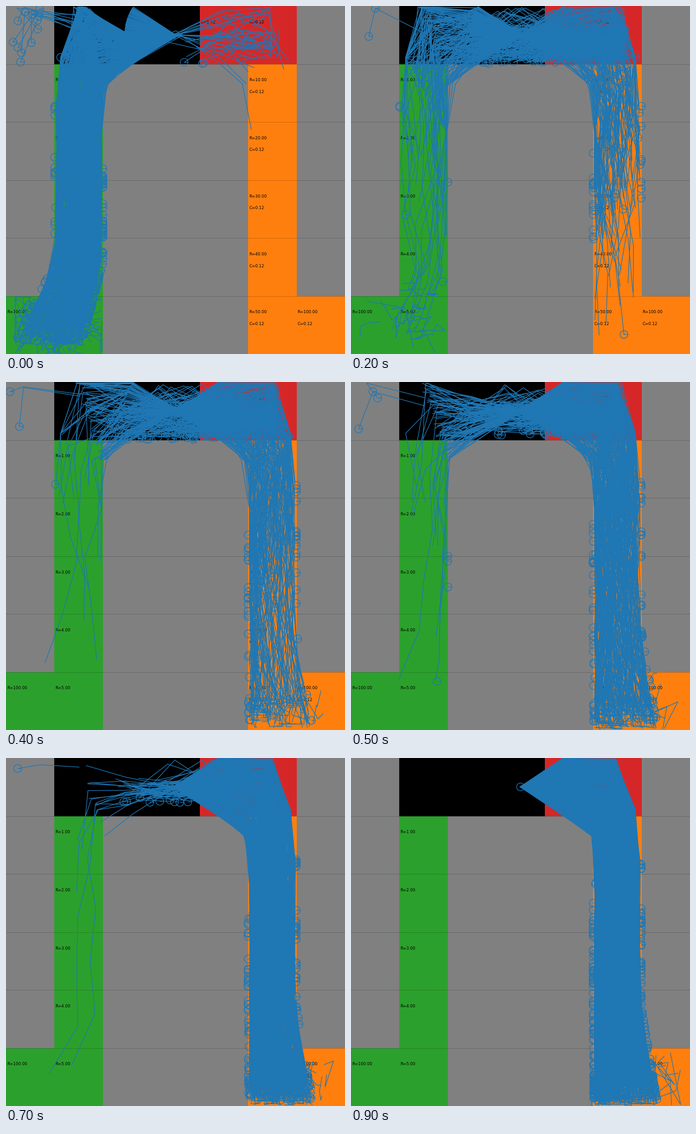
These frames come from a looping animation (738 px wide and 759 px high, 1000 ms). A matplotlib script:

```python
import numpy as np
import matplotlib.pyplot as plt
from matplotlib.animation import FuncAnimation
from matplotlib.collections import LineCollection
from matplotlib.patches import Rectangle

W, H, DPI = 738, 759, 64
PX = 72 / DPI                      # points per pixel
CW, CH = W / 7, H / 6              # grid cell
CX, CY, STEP = 369, 63, 111        # start point and stride of every walk
BLUE, GREEN, RED, ORANGE = "#1f77b4", "#2ca02c", "#d62728", "#ff7f0e"


def keyed(i, frames, values):
    return float(np.interp(i, frames, values))


def count(i, frames, values):
    return round(keyed(i, frames, values))


def bundles(i):
    """Groups of walks: side, count, strides, lowest lane, lane noise."""
    noise = keyed(i, (0, 3, 9), (.2, .3, .02))
    low = .45 if i == 0 else .2 if i > 4 else 0
    groups = [
        (-1, count(i, (1, 3, 4), (260, 180, 0)), 1, 0, .02 + .03 * i),
        (-1, count(i, (0, 1, 2, 4, 8, 9), (400, 380, 14, 4, 2, 0)),
         9 if i < 4 else 7, low, noise),
        (-1, count(i, (1, 2, 3, 5, 7, 9), (0, 150, 100, 75, 10, 0)),
         3 if i < 4 else 2, low, noise),
        (-1, count(i, (1, 2, 4, 7), (0, 22, 18, 3)) * (i < 8), 5 if i < 4 else 4,
         low, noise),
        (1, count(i, (0, 1, 2, 3, 5, 6), (16, 45, 130, 130, 70, 0)),
         2 if i < 2 else 5, 0, noise),
        (1, count(i, (0, 1, 2, 3, 4, 7, 9), (3, 24, 22, 30, 110, 500, 620)),
         min(9, 4 + 8 * i // 5), 0, noise),
    ]
    return [g for g in groups if g[1]]


def above(a, level):
    return np.maximum(a - level, 0)


def walk(rng, side, n, strides, low, noise):
    """Walks from the start, around a corner and down one of the columns."""
    raw = rng.random(n)
    angle = 1.2 * (low + (1 - low) * raw) - .6

    def lane():
        return np.clip(raw + rng.normal(0, noise, n), 0, 1)

    us = [rng.normal(0, 30 * noise, n), STEP * np.cos(angle)]
    vs = [np.full(n, CY), CY + STEP * np.sin(angle)]
    s = lane()
    us.append(206 - 50 * s + rng.normal(0, 30 * noise, n))
    vs.append(2 + 168 * s)
    s = lane()
    u, v = 250 - 89 * s, 112 + 166 * s
    end = rng.uniform(690, 757, n) if side > 0 else rng.uniform(590, 740, n)
    marks = []
    for _ in range(3, strides + 1):
        hit = (u < 160) | (u > 261)
        wall = np.clip(u, 158, 263)
        u = np.where(u < 160, 320 - u, np.where(u > 261, 522 - u, u))
        v = np.minimum(v, end)
        out = (u - 160) / 100
        flare = (above(v, 540) * .17 * out if side > 0
                 else above(v, 560) * (.25 + .25 * out))
        us.append(u + flare)
        vs.append(v)
        show = (hit & (rng.random(n) < .4) & (v < 745)) | (rng.random(n) < .02)
        marks += zip(CX + side * (wall + flare)[show], v[show])
        u = u + rng.normal(0, 17, n)
        v = v + STEP * rng.uniform(.93, 1.07, n)
    points = np.stack([CX + side * np.array(us), np.array(vs)], -1).swapaxes(0, 1)
    lengths = strides + 1 - (rng.random(n) < .4) * (2 < strides < 9)
    return [p[:k] for p, k in zip(points, lengths)], marks


def strolls(rng, i):
    """Short paths along the top corridor."""
    left = keyed(i, (0, 1, 4, 7, 9), (365, 210, 225, 240, 370))
    right = keyed(i, (0, 1, 2, 6, 7), (590, 500, 600, 590, 480))
    top = keyed(i, (0, 3, 6, 9), (46, 38, 42, 48))
    bottom = keyed(i, (4, 9), (124, 76))
    paths, marks = [], []
    for _ in range(count(i, (0, 1, 2, 3, 7, 8, 9), (24, 240, 330, 340, 75, 14, 0))):
        x = rng.uniform(left, right - 70) + 95 * np.arange(3)
        x = np.minimum(x + rng.normal(0, 8, 3), right + rng.uniform(-25, 5))
        y = rng.uniform(top, bottom, 3)
        if rng.random() < .14:
            y[1] = rng.uniform(3, top)
        paths.append(np.column_stack([x, y]))
        if rng.random() < .12:
            marks.append((x[0], max(y[0], bottom - rng.uniform(-2, 14))))
    return paths, marks


def strays(rng, i):
    """Paths that leave through the top left."""
    paths, marks = [], []
    for _ in range(count(i, (0, 1, 2, 3, 7, 8), (9, 18, 1, 3, 1, 0))):
        tip = rng.uniform(8, 75), rng.uniform(10, 128)
        knee = rng.normal(55, 14), abs(rng.normal(8, 8))
        paths.append([(160, rng.uniform(15, 60)), knee, tip])
        marks += [tip] if rng.random() < .7 else [tip, knee]
    return paths, marks


def nest(rng, n, mid, spread, low, high):
    """Tangles in the bottom rooms."""
    paths = []
    for _ in range(n):
        x = np.clip(rng.normal(mid, spread) + rng.normal(0, 24, 4), low, high)
        y = np.clip(rng.normal(695, 24) + rng.normal(0, 28, 4), 635, 757)
        paths.append(np.column_stack([x, y]))
    return paths, []


theta = np.linspace(0, 2 * np.pi, 33)
RING = 8.5 * np.column_stack([np.cos(theta), np.sin(theta)])
RING = np.vstack([[0, 0], RING])   # includes the spoke to the right

fig = plt.figure(figsize=(W / DPI, H / DPI), dpi=DPI, facecolor="#808080")
ax = fig.add_axes([0, 0, 1, 1])
ax.set(xlim=(0, W), ylim=(H, 0))
ax.axis("off")


def cells(col, row, cols, rows, color):
    ax.add_patch(Rectangle((col * CW, row * CH), cols * CW, rows * CH,
                           fc=color, lw=0, zorder=1))


def label(col, y, text):
    ax.text(col * CW + 2, y, text, fontsize=8.7 * PX, family="DejaVu Sans",
            color="black", va="baseline", zorder=3)


cells(1, 0, 3, 1, "black")
cells(4, 0, 2, 1, RED)
cells(1, 1, 1, 5, GREEN)
cells(0, 5, 1, 1, GREEN)
cells(5, 1, 1, 5, ORANGE)
cells(6, 5, 1, 1, ORANGE)
for row in range(1, 6):
    ax.axhline(row * CH, color="black", alpha=.2, lw=PX, zorder=2)
    label(1, row * CH + 38, f"R={row}.00")
    label(5, row * CH + 38, f"R={row}0.00")
    label(5, row * CH + 63.5, "C=0.12")
label(0, 5 * CH + 38, "R=100.00")
label(6, 5 * CH + 38, "R=100.00")
label(6, 5 * CH + 63.5, "C=0.12")
for col in (4, 5):
    label(col, 38, "C=0.12")

lines = LineCollection([], colors=BLUE, linewidths=1.4 * PX, zorder=4)
rings = LineCollection([], colors=BLUE, linewidths=1.4 * PX, zorder=5)
ax.add_collection(lines, autolim=False)
ax.add_collection(rings, autolim=False)


def draw(i):
    rng = np.random.default_rng(40 + i)
    parts = [walk(rng, *group) for group in bundles(i)]
    parts += [strolls(rng, i), strays(rng, i)]
    parts.append(nest(rng, count(i, (0, 1, 2, 4), (110, 62, 9, 0)), 112, 38, 20, 208))
    parts.append(nest(rng, max(0, i - 2), 672, 18, 636, 727))
    lines.set_segments([p for paths, _ in parts for p in paths])
    marks = [(CX, CY)] + [m for _, spots in parts for m in spots]
    rings.set_segments([RING + np.array(m) for m in marks])
    return lines, rings


anim = FuncAnimation(fig, draw, frames=10, interval=100, repeat=True,
                     repeat_delay=0, blit=False)
plt.show()
```
